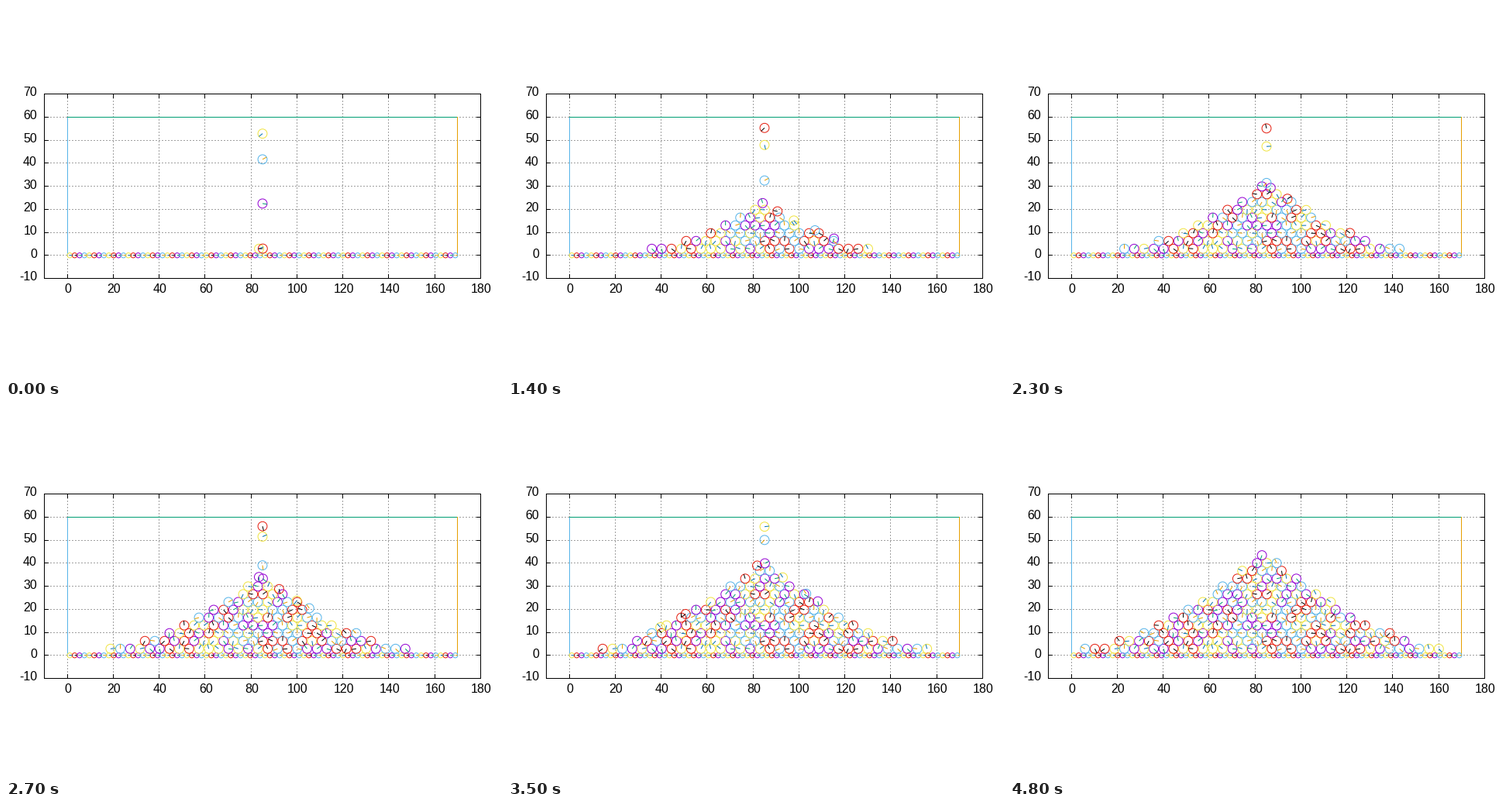
A matplotlib script that plays this animation: 640x480 px, repeating every 4900 ms.

```python
import numpy as np
import matplotlib.pyplot as plt
from matplotlib.animation import FuncAnimation
from matplotlib.collections import EllipseCollection, LineCollection

FRAMES, INTERVAL = 49, 100
BALLS, RATE = 200, 4.895          # balls in total, balls released per frame
X0, Y0, FALL = 85, 56, 4          # nozzle and half the gravity
RADIUS, DX, DY = 2, 4.28, 3.38    # ball radius and pile lattice
BASE, MID, WIDE, TALL = 2.85, 84, 79, 42   # heap at its full size
RIMS = ["#f0e442", "#e51e10", "#9400d3", "#56b4e9"]
SPOKES = ["#0072b2", "#000000", "#009e73", "#e69f00"]
LW = 0.72                         # one pixel in points


def px(x):
    return 49.5 + (np.asarray(x) + 10) * 563 / 190


def py(y):
    return 113.5 + (70 - np.asarray(y)) * 238 / 80


def snap(v):
    return np.floor(v) + 0.5


def surface(x, grown):
    """Height of the heap at x; it first spreads, then steepens."""
    reach = 1 - np.abs(x - MID) / (WIDE * grown ** 0.36)
    return BASE + TALL * grown ** 0.64 * np.clip(reach, 0, 1) ** 1.5


def build_pile():
    """Lattice sites in the order in which the growing heap covers them."""
    row, j = np.mgrid[0:14, -20:21].reshape(2, -1)
    x, y = 83 + (j + row % 2 / 2) * DX, BASE + row * DY
    low, high = np.full(x.shape, 1e-9), np.full(x.shape, 2.0)
    for _ in range(50):
        mid = (low + high) / 2
        inside = (np.abs(x - MID) < WIDE * mid ** 0.36) & (surface(x, mid) >= y)
        low, high = np.where(inside, low, mid), np.where(inside, mid, high)
    order = np.argsort(high, kind="stable")[:BALLS]
    return x[order], high[order]


rng = np.random.default_rng(4)
site, grown = build_pile()
spin = rng.uniform(0, 2 * np.pi, BALLS)
drop = np.sqrt((Y0 - surface(X0, grown)) / FALL)
roll = 1.6 + np.abs(site - X0) / 8


def pose(frame):
    age = RATE * (frame + 1) - np.arange(BALLS)
    u = np.clip((age - drop) / roll, 0, 1)
    x = X0 + (site - X0) * u * u * (3 - 2 * u)
    y = np.where(age < drop, Y0 - FALL * age ** 2, surface(x, grown))
    angle = spin - (x - X0) / RADIUS
    n = np.count_nonzero(age >= 0)
    return x[:n], y[:n], angle[:n]


def centers(x, y):
    return np.column_stack([px(x), py(y)])


def spokes(x, y, angle, r):
    tips = centers(x + r * np.cos(angle), y + r * np.sin(angle))
    return np.stack([centers(x, y), tips], axis=1)


fig = plt.figure(figsize=(6.4, 4.8), dpi=100, facecolor="white")
ax = fig.add_axes([0, 0, 1, 1])
ax.set_xlim(0, 640)
ax.set_ylim(480, 0)
ax.axis("off")


def line(xs, ys, color, z, **kw):
    ax.plot(snap(px(xs)), snap(py(ys)), color=color, lw=LW, zorder=z,
            snap=False, **kw)


def add_balls(x, y, angle, r, z):
    size = 2 * r * 563 / 190
    rims = EllipseCollection(
        [size], [size], [0], units="xy", offsets=centers(x, y),
        offset_transform=ax.transData, facecolors="none", edgecolors=RIMS,
        linewidths=LW, zorder=z)
    rods = LineCollection(spokes(x, y, angle, r), colors=SPOKES,
                          linewidths=LW, zorder=z + 0.1)
    for part in (rims, rods):
        part.set_snap(False)
        ax.add_collection(part, autolim=False)
    return rims, rods


def label(x, y, text, ha):
    ax.text(x, y, text, ha=ha, va="baseline", family="Liberation Sans",
            fontsize=16 * LW, color="black")


# Grid, inward ticks, labels and border
dash = dict(linestyle=(0.5, (2, 2)), dash_capstyle="butt")
for v in range(0, 181, 20):
    if v < 180:
        line([v, v], [-10, 70], "#a0a0a0", 1, **dash)
    for edge, d in ((-10, 1.7), (70, -1.7)):
        line([v, v], [edge, edge + d], "black", 5)
    label(px(v) + 1, 370, str(v), "center")
for v in range(-10, 71, 10):
    if -10 < v < 70:
        line([-10, 180], [v, v], "#a0a0a0", 1, **dash)
    for edge, d in ((-10, 1.7), (180, -1.7)):
        line([edge, edge + d], [v, v], "black", 5)
    label(40, py(v) + 3, str(v), "right")
line([-10, 180, 180, -10, -10], [-10, -10, 70, 70, -10], "black", 5)

# Walls and the floor of small fixed balls
line([0, 0], [0, 60], "#56b4e9", 2)
line([0, 170], [60, 60], "#009e73", 2)
line([170, 170], [0, 60], "#e69f00", 2)
step = 170 / 80
floor_x = (np.arange(80) + 0.5) * step
add_balls(floor_x, 0 * floor_x, 0 * floor_x, step / 2, 3)

rims, rods = add_balls(*pose(0), RADIUS, 4)


def update(frame):
    x, y, angle = pose(frame)
    rims.set_offsets(centers(x, y))
    rods.set_segments(spokes(x, y, angle, RADIUS))
    return rims, rods


anim = FuncAnimation(fig, update, frames=FRAMES, interval=INTERVAL, repeat=True)
plt.show()
```
